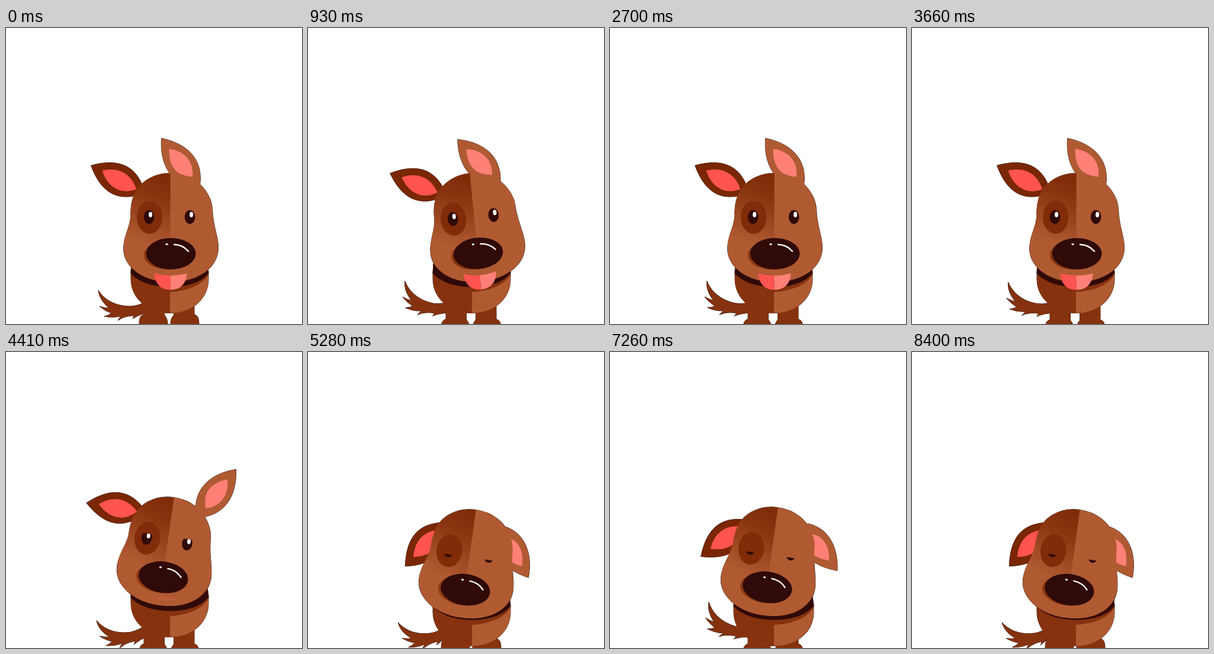
Recreate the animation shown at these times as an HTML page. Size 500 by 500 pixels, loop 9000 ms.

```html
<!DOCTYPE html>
<html lang="en">
<head>
<meta charset="utf-8">
<title>Sleepy puppy</title>
<style>
html, body { margin: 0; width: 100%; height: 100%; overflow: hidden; background: #fff; }
svg { display: block; width: 100%; height: 100%; }
.skin { fill: #b05a32; }
.dark { fill: #86320e; }
.ink { fill: #300a08; }
.rose { fill: #ff5450; }
.pink { fill: #ff8077; }
</style>
</head>
<body>
<svg viewBox="0 0 500 500">
  <defs>
    <linearGradient id="faceShade" gradientUnits="userSpaceOnUse" x1="270" y1="255" x2="232" y2="364">
      <stop offset="0" stop-color="#802b08"/>
      <stop offset=".3" stop-color="#893510"/>
      <stop offset="1" stop-color="#b05a32"/>
    </linearGradient>
    <path id="headShape" d="M277 246C252 246 230 258 219 276C211 290 210 305 210 320C208 340 198 352 198 374C198 405 232 430 277 430C325 430 358 405 358 372C358 355 351 340 348.500 315C348 300 346 290 338 278C328 262 308 246 277 246Z"/>
    <path id="bodyShape" d="M212 398L211 412V424C211 457 240 481.500 277 481.500C315 481.500 342 457 342 424V412L340 398Z"/>
    <path id="leg" d="M233 440V484C228 485 225 489 225 500V515H273V500C273 494 271 488 267.500 485V440Z"/>
    <g id="pupil">
      <ellipse class="ink" rx="8.800" ry="11.700"/>
      <ellipse cx="2.5" cy="-4" rx="3" ry="4.6" fill="#fff"/>
    </g>
    <clipPath id="headClip"><use href="#headShape"/></clipPath>
    <clipPath id="bodyClip"><use href="#bodyShape"/></clipPath>
    <clipPath id="lidClip"><rect id="lid" x="200" y="300" width="150" height="60"/></clipPath>
  </defs>

  <!-- thin dark rim around the silhouette -->
  <use href="#dog" stroke="#2b211d" stroke-width="1"/>

  <g id="dog">
    <path id="tail" class="dark" d="M156 443C164 456 181 470 210 470C222 469 230 466 238 461L242 480C232 482 222 486 214 491C215 489 215 488 217 486C207 486 198 488 189 494C191 490 193 488 195 486.500C185 489 175 489 166 487C171 486 175 484 178 481.500C170 479 164 475 158 470C164 472 169 473 174 473C164 465 157 454 156 443Z"/>
    <g id="legs" class="dark">
      <use href="#leg"/>
      <use href="#leg" transform="translate(551 0) scale(-1 1)"/>
    </g>

    <g id="body">
      <use href="#bodyShape" class="skin"/>
      <g clip-path="url(#bodyClip)">
        <rect class="dark" x="205" y="395" width="72" height="95"/>
        <path class="dark" d="M277 400H343V415C333 434 308 444 277 446Z"/>
      </g>
      <path class="ink" d="M212 398L211 415C225 430 250 437.500 277 437.500C305 437.500 330 430 342 414L340 398Z"/>
    </g>

    <g id="head">
      <g id="earL">
        <path fill="#7a2703" d="M143 233C183 222 215 229 230 267L222 283C185 293 159 277 143 233Z"/>
        <path class="rose" d="M162 241.500C190 235 211 247 219.500 273C195 283 171 271 162 241.500Z"/>
      </g>
      <g id="earR">
        <path class="skin" d="M262 187C305 196 333 222 327 266L308 268C276 259 259 229 262 187Z"/>
        <path class="pink" d="M275 205C300 208 317 225 314.500 252C290 251 274 238 275 205Z"/>
      </g>
      <use href="#headShape" class="skin"/>
      <rect x="190" y="240" width="87" height="126" fill="url(#faceShade)" clip-path="url(#headClip)"/>
      <ellipse cx="242" cy="320.5" rx="21.700" ry="27.800" fill="#812b08"/>
      <g clip-path="url(#lidClip)">
        <use href="#pupil" x="241" y="320"/>
        <use href="#pupil" x="310" y="320"/>
      </g>
      <ellipse cx="273" cy="384.5" rx="41" ry="24.5" fill="#8c3911"/>
      <ellipse class="ink" cx="278" cy="382" rx="42" ry="26.5"/>
      <ellipse cx="271" cy="366" rx="2.2" ry="1.5" fill="#fff" stroke="none"/>
      <path d="M283.500 366.500Q298 367 307.500 378" fill="none" stroke="#fff" stroke-width="2.400" stroke-linecap="round"/>
      <g id="tongue">
        <path class="rose" d="M250 415Q263 419 277 419V443C261 443 251 433 250 415Z"/>
        <path class="pink" d="M277 419Q292 419 305 415C304 433 294 443 277 443Z"/>
      </g>
    </g>
  </g>
</svg>
<script>
const LOOP = 9000, CYCLE = 990, START = 330;
const part = id => document.getElementById(id);
const [tail, legs, body, head, earL, earR, tongue, lid] =
  ["tail", "legs", "body", "head", "earL", "earR", "tongue", "lid"].map(part);

const clamp = x => Math.min(1, Math.max(0, x));
const smooth = x => x * x * (3 - 2 * x);
const span = (t, from, to) => clamp((t - from) / (to - from));
const ease = (t, from, to) => smooth(span(t, from, to));
const swell = (t, from, peak, to) => ease(t, from, peak) - ease(t, peak, to);
const set = (el, value) => el.setAttribute("transform", value);
const turn = (deg, x, y) => `rotate(${deg} ${x} ${y})`;

function draw(t) {
  const play = Math.max(0, t - START);
  const phase = play % CYCLE;
  const wave = (1 - Math.cos(2 * Math.PI * phase / CYCLE)) / 2;

  // Awake: wagging, ear flicks, a head tilt
  const wag = t < START + 4 * CYCLE ? 15 * wave * wave : 0;
  const flick = t < 2790 && phase < 390 ? Math.sin(Math.PI * phase / 390) ** 2 : 0;
  const tilt = -6 * swell(t, 330, 810, 1530);
  const rise = t < 2805 ? wave : 1;

  // Dozing off
  const nod = ease(t, 4050, 4400);
  const drop = ease(t, 4430, 4860);
  const foldL = ease(t, 4065, 4980);
  const foldR = ease(t, 4050, 4950);
  const settle = ease(t, 4950, 5280);
  const hide = ease(t, 4050, 4560);

  // One deep breath; loose parts lag behind the head
  const breath = swell(t, 6780, 7260, 7740);
  const out = span(t, 7260, 8400);
  const lag = t < 7260 ? ease(t, 6780, 7260) : (1 - out) ** 2;

  set(tail, turn(wag - 10 * ease(t, 4290, 4470) + 26 * lag, 235, 472));
  set(legs, `translate(0 ${9 * (rise * (1 - drop) + lag)})`);
  const s = 1 + 0.03 * lag;
  set(body, `translate(277 ${430 + 15 * drop}) scale(${s} 1) translate(-277 -430)`);
  set(head, `translate(0.6 ${21 * drop - 4 * breath - 0.8}) ` + turn(tilt + 8 * nod, 277, 290));
  set(earL, turn(10 * flick - 81 * foldL + 9.5 * lag, 230, 278));
  set(earR, turn(16 * flick + 194 * foldR - 16 * settle - 8 * lag, 320, 268));
  set(tongue, `translate(277 415) scale(1 ${1 - hide}) translate(-277 -415)`);
  tongue.setAttribute("opacity", (1 - hide) ** 1.3);
  lid.setAttribute("y", 308 + 19 * ease(t, 4250, 4750));
}

const begin = performance.now();
function tick() {
  draw((performance.now() - begin) % LOOP);
  requestAnimationFrame(tick);
}
draw(0);
requestAnimationFrame(tick);
</script>
</body>
</html>
```
